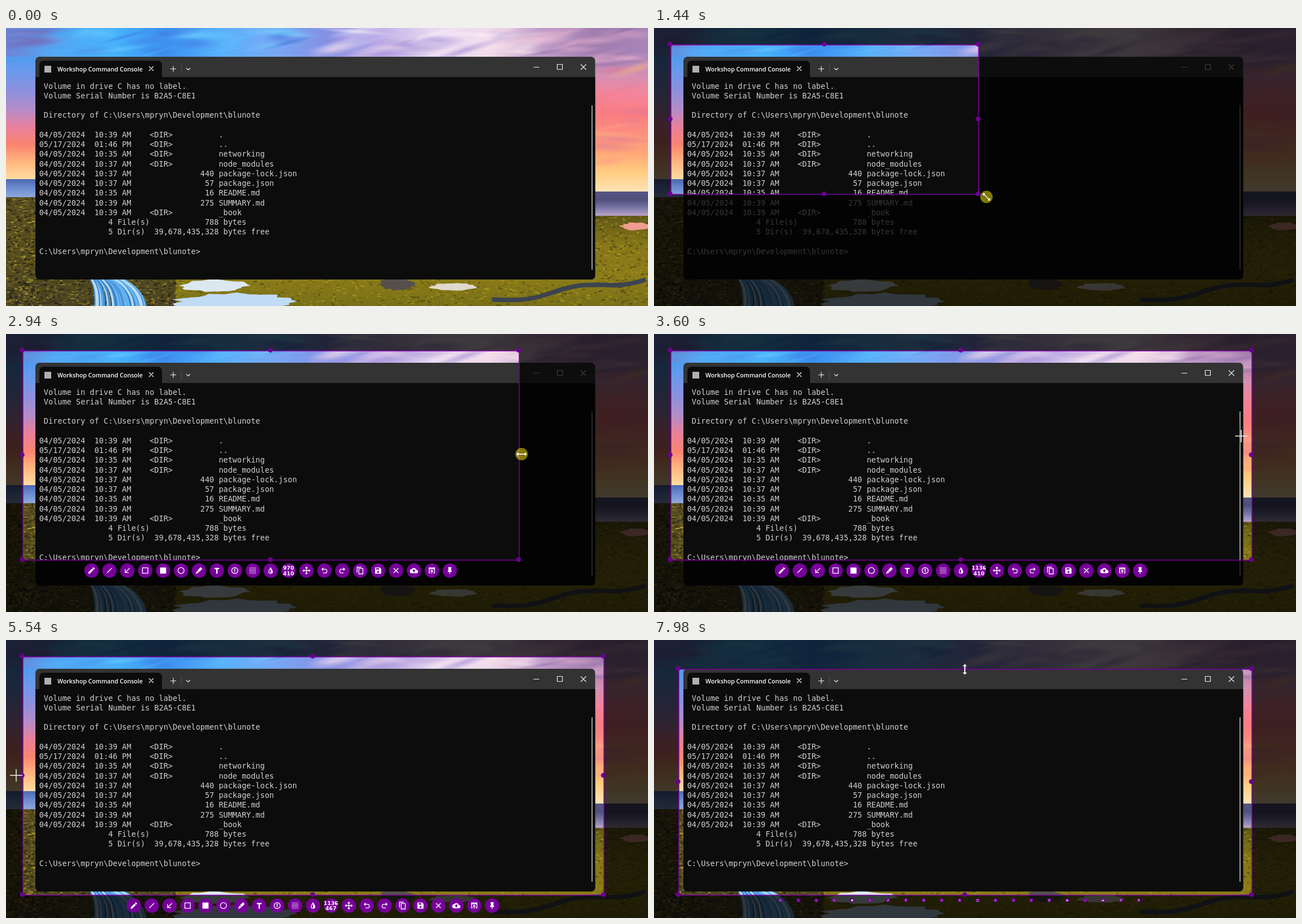
Recreate the animation shown at these times as an HTML page with a canvas. Size 1136 px wide and 493 px high, loop 8 s.

```html
<!DOCTYPE html>
<html lang="en">
<head>
<meta charset="utf-8">
<title>Region capture</title>
<style>
html, body { margin: 0; width: 100%; height: 100%; overflow: hidden; background: #000; }
canvas { display: block; }
</style>
</head>
<body>
<canvas id="stage" width="1136" height="493"></canvas>
<script>
const W = 1136, H = 493, LOOP = 8000, TAU = Math.PI * 2;
const ctx = document.getElementById('stage').getContext('2d');
const scene = document.createElement('canvas');
scene.width = W;
scene.height = H;

let seed = 7;
const rnd = (a = 0, b = 1) => a + (b - a) * ((seed = seed * 16807 % 2147483647) / 2147483647);
const pick = list => list[Math.floor(rnd(0, list.length))];

function repeat(n, fn) {
  for (let i = 0; i < n; i++) fn(i);
}

function disc(g, x, y, r, color) {
  g.fillStyle = color;
  g.beginPath();
  g.arc(x, y, r, 0, TAU);
  g.fill();
}

// ---------- wallpaper ----------

// Fills a box with evenly spaced colours, along x or y.
function band(g, x, y, w, h, colors, along = 'y') {
  const fill = along === 'x' ? g.createLinearGradient(x, 0, x + w, 0) : g.createLinearGradient(0, y, 0, y + h);
  colors.forEach((c, i) => fill.addColorStop(i / (colors.length - 1), c));
  g.fillStyle = fill;
  g.fillRect(x, y, w, h);
}

function clouds(g, x, y, w, h, count, colors) {
  repeat(count, () => {
    const rgb = pick(colors);
    const fill = g.createRadialGradient(0, 0, 0, 0, 0, 1);
    fill.addColorStop(0, `rgba(${rgb},${rnd(.3, .6)})`);
    fill.addColorStop(1, `rgba(${rgb},0)`);
    g.save();
    g.translate(rnd(x, x + w), rnd(y, y + h));
    g.rotate(rnd(-.35, .1));
    g.scale(rnd(25, 80), rnd(4, 12));
    g.fillStyle = fill;
    g.fillRect(-1, -1, 2, 2);
    g.restore();
  });
}

function grain(g, x, y, w, h, count, colors) {
  repeat(count, () => {
    g.fillStyle = pick(colors);
    g.globalAlpha = rnd(.3, .8);
    g.fillRect(rnd(x, x + w), rnd(y, y + h), rnd(1, 7), rnd(1, 3));
  });
  g.globalAlpha = 1;
}

// A ragged ellipse.
function patch(g, x, y, rx, ry, color) {
  g.fillStyle = color;
  g.beginPath();
  repeat(28, i => {
    const a = i / 28 * TAU, r = rnd(.8, 1.1);
    g.lineTo(x + Math.cos(a) * rx * r, y + Math.sin(a) * ry * r);
  });
  g.fill();
}

function drawWallpaper(g) {
  band(g, 0, 50, 560, 220, ['#4f9cf0', '#6f98ea', '#8f90dc', '#b48cc8', '#e8809c', '#fa8470', '#ffb880', '#ffe0a4']);
  band(g, 560, 50, 576, 240, ['#a884b8', '#d490b4', '#f4849a', '#fa7c80', '#fc9080', '#ffa878', '#ffcc80', '#ffe4b8']);
  band(g, 0, 0, W, 51, ['#6c84d8', '#50a8f4', '#48b4fc', '#3c90f0', '#58b0fa', '#78a8f4', '#8490e4',
    '#c0b0e8', '#e8d8f0', '#f0dcec', '#c09cc8', '#a07cb0', '#a884b8'], 'x');
  clouds(g, 0, 0, 110, 30, 10, ['110,100,180', '150,140,210']);
  clouds(g, 100, 5, 420, 45, 24, ['120,215,255', '60,110,220', '90,190,255']);
  clouds(g, 560, 0, 380, 50, 30, ['255,245,250', '150,130,210', '255,225,235']);
  clouds(g, 930, 0, 200, 70, 16, ['120,95,160', '240,180,205']);
  clouds(g, 1060, 70, 70, 170, 14, ['255,130,140', '220,120,150', '255,190,130']);

  band(g, 0, 268, 560, 32, ['#4e68b0', '#6c8cd0', '#90a8dc']);
  band(g, 560, 290, 576, 44, ['#565484', '#50507c', '#7c78a8', '#c0a8cc']);
  band(g, 0, 300, 300, 193, ['#5c5020', '#58501c', '#4c4420']);
  band(g, 300, 333, 836, 160, ['#605818', '#887818', '#8c7c18', '#787018']);
  grain(g, 0, 300, 55, 193, 700, ['#24221a', '#c0a430', '#3c3822', '#141412', '#8c7c3c']);
  grain(g, 0, 445, 300, 48, 900, ['#201f1a', '#4a442c', '#a89430', '#141414', '#706440']);
  grain(g, 300, 445, 836, 48, 900, ['#5c5414', '#b8a020', '#484218', '#a08c1c']);
  grain(g, 1036, 333, 100, 120, 350, ['#3c3c18', '#b89c20', '#4c4c20', '#8c7c1c']);
  patch(g, 1116, 352, 30, 7, '#f09c90');

  // waterfall
  repeat(90, () => {
    const x = rnd(148, 204);
    g.strokeStyle = pick(['#3c84cc', '#4c9ce0', '#64b4f0', '#b4dcf8']);
    g.lineWidth = rnd(1, 4);
    g.beginPath();
    g.moveTo(x, 444);
    g.quadraticCurveTo(x + 10 + (x - 148) * .5, 460, x + 8 + (x - 148) * .65, H);
    g.stroke();
  });

  patch(g, 368, 457, 62, 11, '#dce8f0');
  patch(g, 408, 485, 112, 15, '#c0dcf4');
  patch(g, 692, 454, 31, 11, '#55504c');
  patch(g, 790, 459, 40, 7, '#e0d8cc');
  g.strokeStyle = '#3c4450';
  g.lineWidth = 8;
  g.beginPath();
  for (let x = 860; x <= W; x += 8) g.lineTo(x, 485 - (x - 860) * .15 + Math.sin(x / 28) * 5);
  g.stroke();
}

// ---------- terminal ----------

function drawTerminal(g) {
  const line = (color, d) => {
    g.strokeStyle = color;
    g.lineWidth = 1.2;
    g.stroke(new Path2D(d));
  };
  const box = (color, x, y, w, h, r) => {
    g.fillStyle = color;
    g.beginPath();
    g.roundRect(x, y, w, h, r);
    g.fill();
  };
  box('#333333', 52, 51, 990.5, 395, 7);
  box('#0c0c0c', 52, 87, 990.5, 359, [0, 0, 7, 7]);
  box('#0c0c0c', 59, 58, 217, 30, [7, 7, 0, 0]);
  box('#b0b0b0', 68, 67, 12, 12, 0);
  box('#9a9a9a', 1036, 137, 2, 292, 1);
  line('#eeeeee', 'M253 68l8 8m0-8l-8 8M291 72.5h10m-5-5v10M319 71l3.5 3.5 3.5-3.5');
  line('#eeeeee', 'M933.5 69.5h10M975.5 64.5h9v9h-9zM1017 64.5l9.5 9.5m0-9.5l-9.5 9.5');
  line('#4a4a4a', 'M310.5 63v18');

  g.fillStyle = '#ffffff';
  g.font = '600 10.6px "Open Sans", sans-serif';
  g.fillText('Workshop Command Console', 91, 77);

  const entry = (time, size, name, date = '04/05/2024') =>
    `${date}  ${time}    ` + (size ? size.padStart(14) : '<DIR>'.padEnd(14)) + ' ' + name;
  const home = 'C:\\Users\\mpryn\\Development\\blunote';
  const indent = ' '.repeat(15);
  const rows = [
    ' Volume in drive C has no label.',
    ' Volume Serial Number is B2A5-C8E1',
    '',
    ' Directory of ' + home,
    '',
    entry('10:39 AM', '', '.'),
    entry('01:46 PM', '', '..', '05/17/2024'),
    entry('10:35 AM', '', 'networking'),
    entry('10:37 AM', '', 'node_modules'),
    entry('10:37 AM', '440', 'package-lock.json'),
    entry('10:37 AM', '57', 'package.json'),
    entry('10:35 AM', '16', 'README.md'),
    entry('10:39 AM', '275', 'SUMMARY.md'),
    entry('10:39 AM', '', '_book'),
    indent + '4 File(s)            788 bytes',
    indent + '5 Dir(s)  39,678,435,328 bytes free',
    '',
    home + '>'
  ];
  g.fillStyle = '#d0d0d0';
  g.font = '13.54px "DejaVu Sans Mono", monospace';
  rows.forEach((row, i) => g.fillText(row, 58.7, 107.8 + 17.23 * i));
}

// ---------- motion ----------

// A value that eases through legs of [from, to, target, bend]; bend curves the path.
const track = (first, legs) => t => legs.reduce((value, [from, to, target, bend = 0]) => {
  const f = Math.min(1, Math.max(0, (t - from) / (to - from)));
  const p = f * f * (3 - 2 * f);
  return value + (target - value) * (p + bend * p * (1 - p));
}, first);

// Pointer legs: from, to, x, y, bend of y.
const moves = [
  [60, 850, 30, 30],
  [950, 1780, 908, 400, .4],
  [2220, 2520, 911, 213],
  [2920, 3300, 1058, 213],
  [3510, 4300, 544, 403, -5.8],
  [4620, 4960, 544, 452],
  [5120, 5300, 164, 280],
  [5300, 5540, 18, 240],
  [5540, 5600, 37, 251],
  [5770, 5860, 29, 247],
  [6250, 6580, 46, 243],
  [6600, 6770, 43, 243],
  [6810, 7250, 550, 34],
  [7350, 7900, 550, 52]
];
const pointerX = track(560, moves.map(([from, to, x]) => [from, to, x]));
const pointerY = track(270, moves.map(([from, to, , y, bend]) => [from, to, y, bend]));
const edges = {
  left: track(30, [[6250, 6570, 48], [6590, 6760, 44]]),
  top: track(30, [[7350, 7890, 52]]),
  right: track(30, [[950, 1780, 908], [2930, 3300, 1058]]),
  bottom: track(30, [[950, 1780, 401, .4], [4620, 4950, 452.5]])
};
const EDGE_LAG = 9;

// Pointer looks: start, kind, pressed.
const phases = [
  [60, 'cross'], [950, 'diagonal', true], [1990, 'diagonal'],
  [2220, 'cross'], [2500, 'across'], [2750, 'across', true],
  [3510, 'cross'], [4280, 'upright'], [4330, 'upright', true],
  [5120, 'cross'], [5300, 'hidden'], [5540, 'cross'], [5590, 'across'], [6000, 'across', true],
  [6810, 'cross'], [7230, 'upright'], [7350, 'upright', true], [7970, 'upright']
];
const barSpans = [[1990, 2950], [3510, 4600], [5120, 6250], [6810, 7360], [7980, LOOP]];

// ---------- toolbar ----------

const ring = 'M21 12a9 9 0 1 1-18 0a9 9 0 1 1 18 0z';
const undo = '~M9 4L5 8l4 4M5 8h9a5 5 0 0 1 0 11H8';
let dots = '~';
repeat(25, i => dots += `M${3 + i % 5 * 4} ${4 + Math.floor(i / 5) * 4}h2`);

// Paths on a 24 unit grid; "~" means stroked, null is the size label.
const icons = [
  'M3 21v-4L14 6l4 4L7 21zM15 5l3-3 4 4-3 3z',
  '~M5 19L19 5',
  '~M19 5L6 18M6 8v10h10',
  '~M4 4h16v16H4z',
  'M3 3h18v18H3z',
  '~' + ring,
  'M17 2l5 5-9 9-5-5zM7 12l5 5-2 2H7l-1 2H2z',
  'M5 4v4h5v13h4V8h5V4z',
  '~' + ring + 'M10 9l2-2v10',
  dots,
  'M12 2Q-1 21 12 21T12 2M12 6Q3 19 12 19z',
  null,
  '~M12 2v20M2 12h20M9 5l3-3 3 3M9 19l3 3 3-3M5 9l-3 3 3 3M19 9l3 3-3 3',
  undo,
  undo,
  '~M8 6h12v16H8zM3 18V2h13',
  'M3 3h14l4 4v14H3zM6 5v4h9V5zM15 16a3 3 0 1 0-6 0a3 3 0 0 0 6 0z',
  '~M5 5l14 14M19 5L5 19',
  'M6 20a6 6 0 0 1 0-12a7 7 0 0 1 13 2a5 5 0 0 1 0 10zM12 8l-5 5h3v4h4v-4h3z',
  '~M8 19H4V4h16v15h-4M4 7h16M12 21V11M8 15l4-4 4 4',
  'M7 2h10v2h-1v8l2 2v2h-5v6h-2v-6H6v-2l2-2V4H7z'
].map(d => d && { path: new Path2D(d.replace('~', '')), stroked: d[0] === '~' });
const REDO = icons.length - 7;

function drawBar(cx, cy, scale, size) {
  const r = 12.7;
  icons.forEach((icon, i) => {
    ctx.save();
    ctx.translate(cx + (i - 10) * 31.7 - r, cy - r);
    ctx.scale(scale, scale);
    ctx.translate(r, r);
    disc(ctx, 0, 0, r, '#76009a');
    ctx.fillStyle = ctx.strokeStyle = '#ffffff';
    if (!icon) {
      ctx.font = 'bold 9.3px "DejaVu Sans", sans-serif';
      ctx.textAlign = 'center';
      size.forEach((n, row) => ctx.fillText(n, 0, -1.4 + row * 9.8));
    } else {
      ctx.scale(i === REDO ? -.6 : .6, .6);
      ctx.translate(-12, -12);
      ctx.lineWidth = 2.2;
      if (icon.stroked) ctx.stroke(icon.path);
      else ctx.fill(icon.path, 'evenodd');
    }
    ctx.restore();
  });
}

// ---------- selection and pointer ----------

function drawSelection(l, t, r, b) {
  ctx.strokeStyle = '#8400a8';
  ctx.lineWidth = 1.4;
  ctx.strokeRect(l, t, r - l, b - t);
  const xs = [l - 1.5, (l + r) / 2 - 1.2, r - 1];
  const ys = [t - 1.5, (t + b) / 2 - 1.2, b - 1];
  repeat(9, i => {
    if (i !== 4) disc(ctx, xs[i % 3], ys[Math.floor(i / 3)], 4.3, '#6b0090');
  });
}

const arrow = new Path2D('M-9.5 0l4-4v3h11v-3l4 4-4 4v-3h-11v3z');
const cross = new Path2D('M-11 0h22M0-11v22');
const angles = { across: 0, diagonal: TAU / 8, upright: TAU / 4 };

function drawPointer(x, y, kind, pressed) {
  if (kind === 'hidden') return;
  ctx.save();
  ctx.translate(x, y);
  if (pressed) disc(ctx, 0, 0, 11, 'rgba(255,240,0,.5)');
  if (kind === 'cross') {
    ctx.strokeStyle = '#f0f0f0';
    ctx.lineWidth = 1.5;
    ctx.stroke(cross);
  } else {
    ctx.rotate(angles[kind]);
    ctx.strokeStyle = 'rgba(0,0,0,.6)';
    ctx.lineWidth = 1;
    ctx.stroke(arrow);
    ctx.fillStyle = pressed ? '#fffbd0' : '#ffffff';
    ctx.fill(arrow);
  }
  ctx.restore();
}

function draw(t) {
  ctx.drawImage(scene, 0, 0);
  const phase = phases.filter(([from]) => t >= from).pop();
  if (!phase) return;
  const [l, top, r, b] = Object.values(edges).map(edge => edge(t - EDGE_LAG));
  const selecting = t >= 950;

  ctx.fillStyle = 'rgba(0,0,0,.75)';
  ctx.beginPath();
  ctx.rect(0, 0, W, H);
  if (selecting) ctx.rect(l, top, r - l, b - top);
  ctx.fill('evenodd');
  if (selecting) drawSelection(l, top, r, b);

  const bar = barSpans.find(([from, to]) => t >= from && t < to);
  if (bar) {
    const size = [r - l, b - top].map(v => Math.round(v * 1.105));
    drawBar((l + r) / 2 - .8, b + 18.5, Math.min(1, .25 + (t - bar[0]) / 80), size);
  }
  drawPointer(pointerX(t), pointerY(t), phase[1], phase[2]);
}

const g = scene.getContext('2d');
drawWallpaper(g);
drawTerminal(g);

const start = performance.now();
function tick() {
  draw((performance.now() - start) % LOOP);
  requestAnimationFrame(tick);
}
tick();
</script>
</body>
</html>
```
